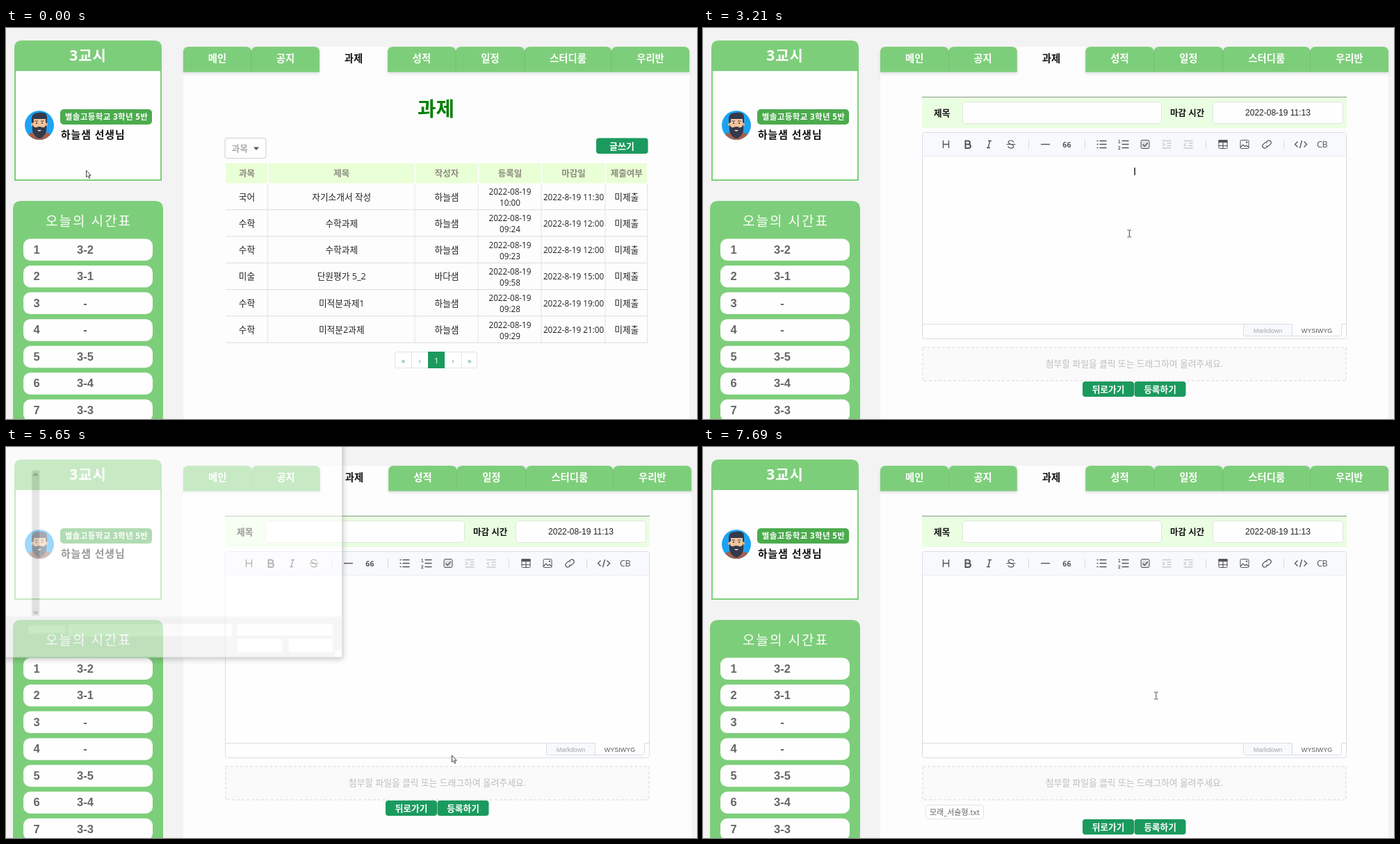
Animation of 994 by 563 pixels, one loop 8100 ms. Source, as an HTML page:

```html
<!DOCTYPE html>
<html lang="ko">
<head>
<meta charset="utf-8">
<title>과제 등록</title>
<style>
html, body { margin: 0; width: 100%; height: 100%; overflow: hidden; background: #f3f3f3; }
svg { display: block; width: 994px; height: 563px; font-family: 'Open Sans', 'Noto Sans CJK KR', 'Noto Sans CJK', sans-serif; }
text { white-space: pre; }
.ar { font-family: 'Liberation Sans', Arial, sans-serif; }
.mid { text-anchor: middle; }
.end { text-anchor: end; }
.b { font-weight: 700; }
.m { font-weight: 500; }
.tabs { filter: drop-shadow(0 2px 2px rgba(0,0,0,.13)); }
.win { filter: drop-shadow(0 2px 5px rgba(0,0,0,.4)); }
.ico { fill: none; stroke: #555; stroke-width: 1.4; }
#dlg { transform-origin: 155px 85px; }
</style>
</head>
<body>
<svg id="stage" viewBox="0 0 994 563"></svg>
<script>
const GREEN = '#7dce7a', DEEP = '#1b9a5e', INK = '#222';

// drawing helpers, each returns markup
const rect = (x, y, w, h, fill, more = '') => `<rect x="${x}" y="${y}" width="${w}" height="${h}" fill="${fill}" ${more}/>`;
const text = (x, y, s, size, fill, cls = '', ls = 0) =>
  `<text x="${x}" y="${y}" font-size="${size}" fill="${fill}" class="${cls}" letter-spacing="${ls}">${s}</text>`;
const path = (d, fill = 'none', more = '') => `<path d="${d}" fill="${fill}" ${more}/>`;
const line = (d, color, w = 1) => path(d, 'none', `stroke="${color}" stroke-width="${w}"`);
const box = (x, y, w, h, fill, stroke, r = 0) => rect(x + .5, y + .5, w - 1, h - 1, fill, `stroke="${stroke}" rx="${r}"`);
const group = (id, ...kids) => `<g id="${id}">${kids.join('')}</g>`;
const roundTop = (x, y, w, h, r, fill) =>
  path(`M${x} ${y + h}v${r - h}q0 ${-r} ${r} ${-r}h${w - 2 * r}q${r} 0 ${r} ${r}v${h - r}z`, fill);
const seq = (n, f) => Array.from({ length: n }, (_, i) => f(i)).join('');

function avatar() {
  return `<clipPath id="face"><circle cx="48" cy="140" r="21"/></clipPath><g clip-path="url(#face)">` +
    rect(27, 119, 42, 42, '#1ca3f4') +
    path('M27 163q1-11 13-13h16q12 2 13 13z', '#a5604c') +
    path('M42 150l6 8 6-8z', '#f3efe9') +
    '<circle cx="38" cy="139" r="2.2" fill="#e5ad85"/><circle cx="58" cy="139" r="2.2" fill="#e5ad85"/>' +
    rect(38.5, 126, 19, 22, '#f2c49c', 'rx="5"') +
    path('M37 137v-8q1-7 9-7q13-2 13 6v9l-2-1v-5h-17v5z', '#343a4b') +
    path('M38 139q2 5 6 4q4-2 8 0q4 1 6-4q1 10-2 14q-4 6-8 6t-8-6q-3-4-2-14z', '#343a4b') +
    path('M45 147h6q-3 3-6 0z', '#fff') +
    '<circle cx="44" cy="137" r="1.1" fill="#333"/><circle cx="52" cy="137" r="1.1" fill="#333"/>' +
    line('M41.500 134h4.500M50 134h4.500', '#343a4b') + '</g>';
}

function sidebar() {
  const classes = ['3-2', '3-1', '-', '-', '3-5', '3-4', '3-3'];
  return rect(13, 40, 210, 179, '#fefefe', `stroke="${GREEN}" stroke-width="2"`) +
    roundTop(12, 18, 212, 44, 11, GREEN) +
    text(118, 47, '3교시', 21, '#fff', 'mid b', 1) + avatar() +
    rect(78, 117, 132, 22, '#4bab4d', 'rx="5"') +
    text(144.500, 132, '별솔고등학교 3학년 5반', 11.500, '#fff', 'mid b', .4) +
    text(79, 158.500, '하늘샘 선생님', 14.800, '#111', 'b', 1) +
    roundTop(10, 249, 216, 320, 12, GREEN) +
    text(119, 284.500, '오늘의 시간표', 19, '#fff', 'mid m', 2) +
    seq(7, i => {
      const y = 303.500 + i * 38.550;
      return rect(25, y, 186, 31.500, '#fefefe', 'rx="10"') +
        text(39.500, y + 21, i + 1, 16.500, '#666', 'ar b') +
        text(114, y + 21, classes[i], 16.500, '#666', 'ar b mid');
    });
}

function tabs(right) {
  const k = (right - 255) / 728;
  const edges = [255, 353, 451, 549, 647, 746, 871, 983].map(x => 255 + (x - 255) * k);
  const names = ['메인', '공지', '과제', '성적', '일정', '스터디룸', '우리반'];
  let tabsUp = '', labels = '';
  names.forEach((name, i) => {
    const x = edges[i], w = edges[i + 1] - x, on = i === 2;
    if (!on) tabsUp += roundTop(x, 27, w, 36.500, 8, GREEN) +
      (i && i !== 3 ? line(`M${x} 33v30`, '#6cbd69', .8) : '');
    labels += text(x + w / 2, 49, name, 14.300, on ? '#111' : '#fff', 'mid b');
  });
  return rect(255, 63, right - 255, 500, '#fdfdfd') +
    rect(edges[2], 27, edges[3] - edges[2], 37, '#fdfdfd') + `<g class="tabs">${tabsUp}</g>` + labels;
}

function listPage() {
  const cols = [316, 377, 588.500, 679.500, 770.500, 862.500, 923];
  const mid = i => (cols[i] + cols[i + 1]) / 2;
  const heads = ['과목', '제목', '작성자', '등록일', '마감일', '제출여부'];
  const rows = [
    ['국어', '자기소개서 작성', '하늘샘', '10:00', '11:30'],
    ['수학', '수학과제', '하늘샘', '09:24', '12:00'],
    ['수학', '수학과제', '하늘샘', '09:23', '12:00'],
    ['미술', '단원평가 5_2', '바다샘', '09:58', '15:00'],
    ['수학', '미적분과제1', '하늘샘', '09:28', '19:00'],
    ['수학', '미적분2과제', '하늘샘', '09:29', '21:00']];
  const table = heads.map((h, i) => rect(cols[i] + (i ? 1 : 0), 195, cols[i + 1] - cols[i] - (i ? 2 : 1), 28.500, '#e9ffd5') +
    text(mid(i), 213.500, h, 12.500, '#8b8b80', 'mid b')).join('') +
    rows.map(([subject, title, who, made, due], i) => {
      const y = 247.500 + i * 38.300, cell = (c, s, size = 12.700, dy = 0) => text(mid(c), y + dy, s, size, INK, 'mid');
      return cell(0, subject) + cell(1, title) + cell(2, who) + cell(3, '2022-08-19', 11.700, -7.500) +
        cell(3, made, 11.700, 8.500) + cell(4, '2022-8-19 ' + due, 11.700) + cell(5, '미제출') +
        line(`M316 ${y + 14.200}H923`, '#dcdcdc');
    }).join('') +
    cols.slice(1).map(x => line(`M${x - .5} 224V453.500`, '#e2e2e2')).join('');
  const pager = box(559, 466, 119, 24, '#fff', '#dee2e6', 3) + rect(607, 466, 24, 24, DEEP) +
    line('M583.500 466v24M655.500 466v24', '#dee2e6') +
    ['«', '‹', '1', '›', '»'].map((s, i) => text(571.500 + i * 23.800, 482.500, s, 11, i === 2 ? '#fff' : '#45a77a', 'mid')).join('');
  return tabs(983) + text(618.500, 126.500, '과제', 28.800, '#0a800a', 'mid b') +
    box(314.500, 158, 60, 30, '#fefefe', '#cfcfcf', 3) + text(324.500, 177.500, '과목', 12.800, '#8a8a8a') +
    path('M356 171.500h8l-4 4.500z', '#555') +
    rect(849, 158.500, 74.500, 22.500, DEEP, 'rx="4"') +
    group('hover', rect(849, 158.500, 74.500, 22.500, '#1e6d48', 'rx="4"')) +
    text(886, 174.500, '글쓰기', 13, '#fff', 'mid b') + table + pager;
}

function toolbar() {
  const ico = (d, more = '') => `<path class="ico" d="${d}" ${more}/>`;
  const pale = 'style="stroke:#c8cbd0"';
  return [468, 549, 723, 835].map(x => line(`M${x}.5 161v13`, '#d6d9de')).join('') +
    ico('M345.500 162v11M353.500 162v11M345.500 167.500h8') +
    ico('M377.500 162.500h3.500q3 0 3 2.500t-3 2.500h-3.500zM377.500 167.500h4q3.500 0 3.500 2.700t-3.500 2.700h-4z', 'style="stroke-width:2"') +
    ico('M410 162.500h5M408 172.500h5M412.800 162.500l-2.600 10') +
    ico('M447 164.500q-1-2.500-4-2.500t-4 2q0 2 4 3.500t4 3q0 2.300-4 2.300t-4-2.500M436.500 167.500h13', 'style="stroke-width:1.200"') +
    ico('M486 167.500h13') + text(523.500, 171.500, '66', 10.500, '#555', 'mid b', .3) +
    ico('M570.500 162.500h10M570.500 167.500h10M570.500 172.500h10M566.500 162.500h2M566.500 167.500h2M566.500 172.500h2') +
    ico('M602.500 162.500h10M602.500 167.500h10M602.500 172.500h10') +
    text(597, 166, '1', 6.500, '#555', 'ar b') + text(597, 175, '2', 6.500, '#555', 'ar b') +
    box(629.500, 161, 13, 13, '#dde1e6', '#555', 2) + ico('M632.500 167.500l2.700 2.700 4.500-5') +
    ico('M660.500 162.500h13M667.500 166h6M667.500 169.500h6M660.500 173h13M661 165.500l3 2.300-3 2.300', pale) +
    ico('M691.500 162.500h13M698.500 166h6M698.500 169.500h6M691.500 173h13M695 165.500l-3 2.300 3 2.300', pale) +
    rect(741.500, 161, 13, 4, '#555') + box(741.500, 161, 13, 13, 'none', '#555', 1.500) + ico('M741.500 169.500h13M748 164v10', 'style="stroke-width:1.200"') +
    group('iconHover', box(767, 156, 23, 23, '#fff', '#e0e3e9', 3)) +
    box(772.500, 161, 13, 13, 'none', '#555', 1.500) + ico('M773 172l3.700-4 3 2.700 2-1.700 3.500 3', 'style="stroke-width:1.200"') + '<circle cx="782" cy="164.500" r="1.200" fill="#555"/>' +
    ico('M810 164.500l2.500-2.300q2-1 3.800.8t.4 3.800l-3 3q-2 1.300-3.500-.2M812 170.500l-2.500 2.300q-2 1-3.800-.8t-.4-3.800l3-3q2-1.300 3.500.2', 'style="stroke-width:1.200"') +
    ico('M855.500 163.500l-4 4 4 4M864.500 163.500l4 4-4 4M861.500 162l-3 11') +
    text(890.500, 172, 'CB', 12.500, '#555', 'mid', -.6);
}

function writePage() {
  const button = (x, s) => rect(x, 509, 74, 22, DEEP, 'rx="4"') + text(x + 37, 524.500, s, 12.700, '#fff', 'mid b');
  return tabs(986) +
    rect(315, 99, 611, 45, '#eafee2') + line('M315 99.500h611', '#8a9c86') +
    text(332, 126.500, '제목', 12.700, '#111', 'b') + text(672, 126.500, '마감 시간', 12.500, '#111', 'b') +
    box(373, 106, 287, 32, '#fefefe', '#dfe6dc', 4) + box(733, 106, 188, 32, '#fefefe', '#dfe6dc', 4) +
    text(827, 126, '2022-08-19 11:13', 12, INK, 'ar mid') +
    group('focus', rect(373.800, 107, 285.500, 30.300, '#fefefe', 'rx="3" stroke="#151515" stroke-width="1.800"') + rect(385, 114, 1, 16, '#222')) +
    box(315, 150, 611, 298, '#fefefe', '#dadde6', 3) + rect(316, 151, 609, 33, '#f7f9fc') +
    line('M316 184.500h609', '#ebedf2') + toolbar() +
    line('M316 426.500h609', '#dadde6') + path('M777.500 426.500h70v17h-68q-2 0-2-2z', '#f7f9fc', 'stroke="#dadde6"') +
    line('M847.500 443.500h69q2 0 2-2v-15', '#dadde6') + line('M848 426.500h70', '#fefefe', 1.500) +
    text(812.500, 439, 'Markdown', 9, '#a3a6ab', 'ar mid') + text(883, 439, 'WYSIWYG', 9, '#555', 'ar mid') +
    rect(316, 460, 609, 48, '#fafafa', 'stroke="#e9e9e9" stroke-width="2" stroke-dasharray="4 3"') +
    text(620.500, 488, '첨부할 파일을 클릭 또는 드래그하여 올려주세요.', 12.800, '#bdbdbd', 'mid') +
    group('chip', box(320, 515, 84, 21, '#fefefe', '#e3e3e3', 4) + text(326, 529.500, '모래_서술형.txt', 11, '#666')) +
    group('buttons', button(546, '뒤로가기'), button(620.500, '등록하기')) +
    group('caret', rect(620.300, 201, 1.500, 11, '#222')) +
    group('tip', path('M776 184.500l3.500-4 3.500 4z', '#444'), rect(771.500, 184, 60, 16, '#444', 'rx="3"'),
      text(801.500, 195, 'Insert image', 9, '#fff', 'ar mid'));
}

function folder(cx, inside = '') {
  return path(`M${cx - 22} 47h38l2 4v52h-40z`, '#eccb6d') + inside +
    path(`M${cx + 4} 76h17v27h-21z`, '#f9dd8a') + path(`M${cx - 22} 47l21 8v53l-21-6z`, '#fbe08f');
}

function sheet(x, y, w, h, stroke = '#c4c4c4') {
  return path(`M${x} ${y}h${w - 10}l10 10v${h - 10}h${-w}z`, '#fcfcfc', `stroke="${stroke}"`) +
    path(`M${x + w - 10} ${y}v10h10`, '#eee', `stroke="${stroke}"`) +
    seq(12, i => line(`M${x + 5} ${y + 13 + i * 4}h${w - 10}`, '#cdcdcd'));
}

function dialog() {
  const label = (x, y, s, size = 9.600) => text(x, y, s, size, INK, 'mid');
  const paper = x => rect(x, 54, 17, 49, '#fff', 'stroke="#ccc" stroke-width=".6"') + seq(7, i => rect(x + 5, 62 + i * 6, 10, 3, i % 3 ? '#8fb8e4' : '#4b8ed0'));
  const photo = rect(344, 52, 32, 52, '#f1f1ef', 'stroke="#ccc" stroke-width=".6"') + path('M347 58q12-6 18 2l8 30-6 12-12-20z', '#34302f') + path('M350 76l20 4-4 24h-16z', '#8a8582');
  const chevron = (x, y, d = 1) => line(`M${x - 3} ${y - 1.500 * d}l3 ${3 * d} 3 ${-3 * d}`, '#555', 1.100);
  const frame = `<g class="win">${rect(-20, -20, 510, 327, '#fff', 'stroke="#9a9a9a"')}</g>` +
    rect(-20, 247, 509.500, 59.500, '#f0f0f0') + rect(35, 33, 11, 213, '#d2d2d2') +
    rect(30, 260, 55, 12, '#fff') + rect(88, 258, 240, 18, '#fff') + rect(336, 258, 140, 17, '#fff') +
    rect(336, 280, 66, 19, '#fff') + rect(411, 280, 65, 19, '#fff') + rect(479, 296, 10, 10, '#fff') +
    chevron(40.500, 39, -1) + chevron(40.500, 241);
  const top = line('M10 0v4.500h315V0M300 0v4M333 0v4.500h149V0', '#d9d9d9') + rect(-2, 9, 491, 22, '#f5f6f7') +
    text(3, 23.500, '폴더', 9.600, '#1e395b') +
    box(399, 16, 12, 8, '#bfdcf5', '#7d93a8') + rect(401, 20, 8, 3, '#3d7fc0') + path('M418 18.500h5l-2.500 3z', '#333') +
    box(440, 16, 11, 8, '#fff', '#5f7f9f') + rect(446, 17, 4, 6, '#3d8fdb') +
    '<circle cx="472.500" cy="20" r="6" fill="#0a62b5"/>' + text(472.500, 23.500, '?', 9.500, '#fff', 'mid b');
  const nav = text(-4, 51, 'e', 9, INK) + line('M0 84v8', '#9fe3f5', 1.500) + text(-4, 110, '드', 9.600, INK) +
    rect(-2, 133, 36, 18, '#d9d9d9') + text(-1, 163, '면', 9.600, INK) + text(-2, 216.500, 'ws10 (C:)', 8.800, INK) + text(1, 235, '(D:)', 8.800, INK) +
    rect(34, 32, 12, 215, '#f0f0f0') + rect(35, 124, 11, 99, '#cdcdcd') + chevron(40, 39, -1) + chevron(40, 241);
  const files = folder(98, paper(99)) + folder(184, paper(185)) + folder(269) + folder(354, photo) +
    box(408, 82, 65, 25, '#fff', '#e2e2e2') + rect(411, 85, 12, 1.500, '#333') +
    seq(7, i => line(`M411 ${89.500 + i * 2.300}h${[50, 54, 44, 57, 35, 48, 28][i]}`, '#777', .7)) +
    label(98.500, 119, 'Linden Garden', 9) + label(98.500, 131, '2017', 9) +
    label(184, 119, 'workspace-sprin', 8.700) + label(184, 131, 'g-tool-suite-4-4.', 8.700) + label(184, 143, '15.1.RELEASE', 8.700) +
    label(269.500, 119, '사용자 지정') + label(269.500, 131, 'Parcel 서식 파일', 9.300) +
    label(355.500, 119, '달빛쪽지 받은 파') + label(355.500, 131, '일') + label(440.500, 119, '#QQKp_e', 9) +
    box(63, 150, 71, 72, '#fefefe', '#dcdcdc') + path('M84 171l5-4h22v39h-27z', '#a3a6a9') + rect(87, 173, 20, 24, '#8b8f93') + rect(87, 199, 17, 2, '#d5d7d9') +
    rect(105, 172, 9, 24, '#fff', 'stroke="#bbb" stroke-width=".6" transform="rotate(6 109 184)"') + rect(107, 177, 6, 14, '#4793d4') + label(98.500, 231, 'OrbelDB', 9) +
    sheet(161, 154, 46, 63) + label(184, 231, '미적분과제') +
    sheet(249.500, 155, 47, 61, '#666') + seq(6, i => line(`M271 ${174 + i * 7}h20`, '#777', 2)) + rect(243, 176, 25, 35, '#2b579a') + label(269.500, 231, '아이디어 정리') +
    rect(316.500, 149, 78, 87, '#e5f3ff') + sheet(332, 154, 46, 63) + label(355.500, 231, '모래_서술형');
  const foot = rect(28, 257, 58, 20, '#f0f0f0') + text(83, 270, '파일 이름(N):', 9.300, INK, 'end') +
    box(88, 258, 240, 18, '#fff', '#0078d7') + rect(90, 261, 1, 12, '#111') + chevron(321, 267) +
    box(336, 258, 140, 17, '#e4e4e4', '#adadad') + text(339, 270, '모든 파일', 9.600, INK) + chevron(469, 267) +
    rect(338, 281, 63, 17, '#e1e1e1', 'stroke="#0078d7" stroke-width="1.800"') + text(369.500, 293, '열기(O)', 9.600, INK, 'mid') +
    box(411, 280, 65, 19, '#e1e1e1', '#adadad') + text(443.500, 293, '취소', 9.600, INK, 'mid') +
    rect(479, 296, 10, 10, '#f0f0f0') + line('M481.500 305l6.500-6.500M485 305l3-3', '#aaa', 1.500);
  return group('dlg', frame, group('files', top, nav, files, foot));
}

function pointer() {
  return group('cursor',
    group('press', '<circle r="9" fill="rgba(255,235,30,.6)"/>'),
    group('arrow', path('M.5 0v9.800l2.200-2 1.700 3.700 1.500-.7-1.700-3.500h3z', '#fff', 'stroke="#333" stroke-width=".9"')),
    group('hand', path('M-1.500-1.500q0-1.200 1-1.200t1 1.200v4.500q3.500.2 5.500 1.500q.8 3-.8 7.500h-5.500q-1-2.500-4-6q0-1.500 2.800.5z', '#fff', 'stroke="#333" stroke-width=".8"')),
    group('beam', line('M-2.500-5h2l.8.700.8-.7h2M.3-4.300v8.600M-2.500 5h2l.8-.7.8.700h2', '#444', 1)));
}

// timeline in ms, written out as CSS keyframes
const LOOP = 8100;
let css = '';
function track(id, keys) {
  const frames = keys.map(([t, value, ease = 'step-end']) =>
    `${Math.max(0, t - 4) / LOOP * 100}%{${value};animation-timing-function:${ease}}`);
  css += `@keyframes ${id}{${frames.join('')}}#${id}{animation:${id} ${LOOP}ms infinite}`;
}
function show(id, ...spans) {
  const keys = spans.flatMap(([on, off]) => [[on, 'opacity:1'], [off, 'opacity:0']]).filter(k => k[0] < LOOP);
  if (spans[0][0] > 0) keys.unshift([0, 'opacity:0']);
  track(id, keys);
}
const at = (t, x, y, steps) => [t, `transform:translate(${x}px,${y}px)`, steps ? `steps(${steps})` : 'step-end'];

track('cursor', [
  at(0, 115, 205), at(150, 60, 197), at(460, 175, 44), at(530, 560, 22), at(600, 980, 3),
  at(930, 947, 172, 6), at(1340, 902, 169), at(1690, 902, 169, 8), at(2230, 454, 124),
  at(2500, 454, 124, 2), at(2640, 892, 125, 2), at(2780, 720, 512, 3), at(2990, 613, 296),
  at(3150, 613, 296, 5), at(3500, 774, 143, 3), at(3680, 783, 171), at(3940, 773, 214),
  at(4020, 760, 251, 7), at(4490, 742, 495), at(4810, 742, 495, 4), at(5090, 731, 498),
  at(5440, 731, 498, 3), at(5650, 641, 444, 9), at(6250, 328, 200),
  at(6670, 328, 200, 6), at(7070, 546, 491), at(7140, 546, 491, 8), at(7690, 651.500, 358)]);
show('arrow', [0, 200], [460, 670], [930, 1130], [1760, 2160], [2700, 2780], [5510, 7000]);
show('hand', [1130, 1760], [2780, 2850], [3610, 3940], [4420, 5510], [7000, 7210]);
show('beam', [2160, 2700], [2850, 3610], [3940, 4420], [7210, LOOP + 9]);
show('press', [1340, 1480], [2300, 2500], [2990, 3150], [5150, 5290], [6320, 6390], [6460, 6530]);
show('hover', [1130, 1830]);
show('list', [0, 1830]);
show('write', [1830, LOOP + 9]);
show('focus', [2300, 2990]);
show('caret', [2990, 3460], [3990, 4520], [5050, 5580]);
show('iconHover', [3610, 4090]);
show('tip', [3940, 4090]);
track('dlg', [
  [0, 'opacity:0;transform:scale(.97)'], [5580, 'opacity:.25;transform:scale(.972)'],
  [5650, 'opacity:.57;transform:scale(.982)'], [5710, 'opacity:.9;transform:scale(.995)'],
  [5780, 'opacity:1;transform:scale(1)'], [6600, 'opacity:.4;transform:scale(.98)'], [6670, 'opacity:0;transform:scale(.97)']]);
show('files', [5780, 6740]);
show('chip', [6740, LOOP + 9]);
track('buttons', [at(0, 0, 0), at(6740, 0, 27)]);

document.getElementById('stage').innerHTML = `<style>${css}</style>` + rect(0, 0, 994, 563, '#f3f3f3') +
  sidebar() + group('list', listPage()) + group('write', writePage()) + dialog() + pointer();
</script>
</body>
</html>
```
